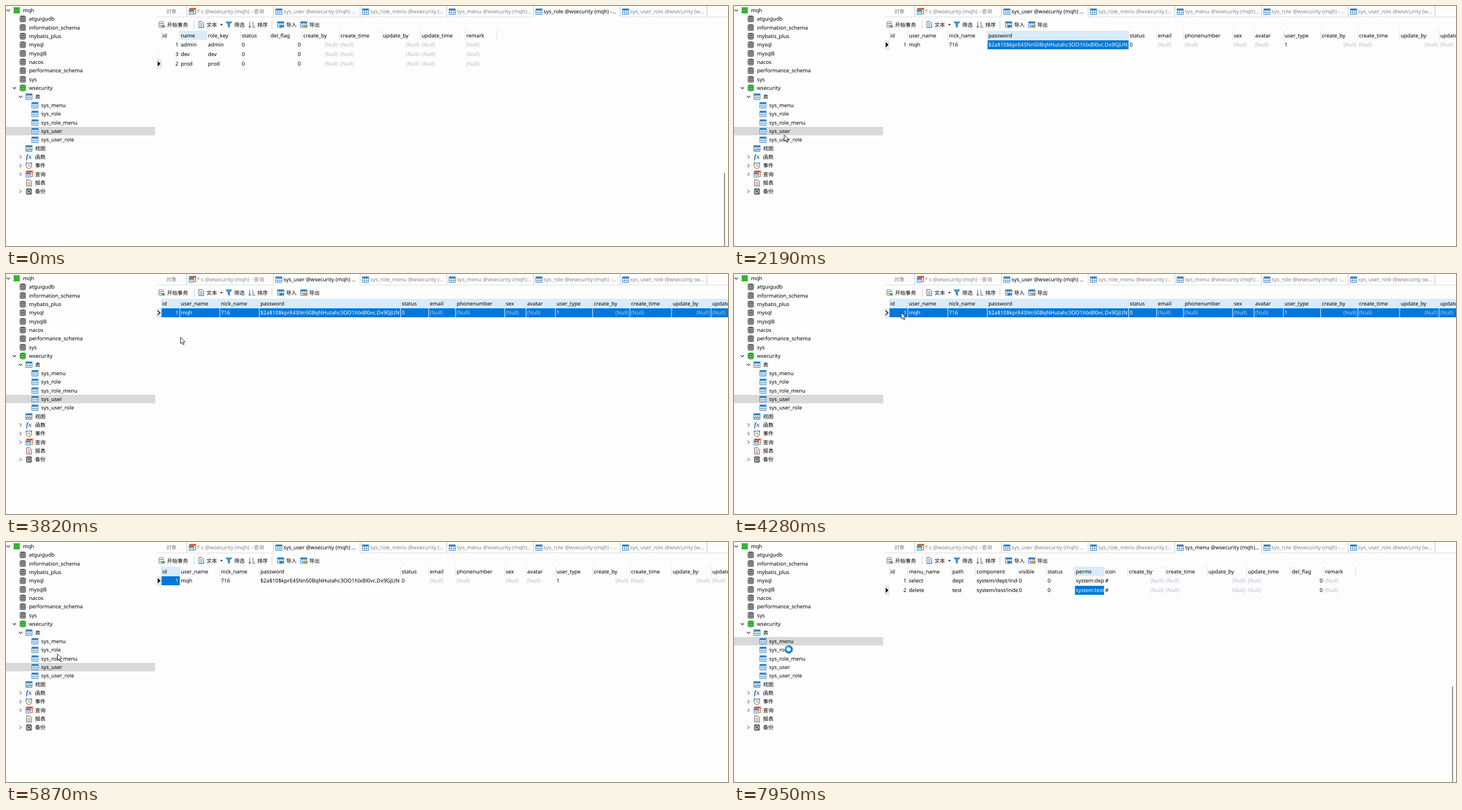
Recreate the animation shown at these times as an HTML page. Size 1280x427 px, loop 8000 ms.

```html
<!DOCTYPE html>
<html lang="zh-CN">
<head>
<meta charset="utf-8">
<title>Database tables</title>
<style>
html, body { margin: 0; width: 100%; height: 100%; overflow: hidden; background: #fdfdfd; }
svg { display: block; }
#stage { width: 1280px; height: 427px; }
text { font: 9.35px "Noto Sans", "Noto Sans CJK SC", "Noto Sans CJK", sans-serif; text-rendering: geometricPrecision; white-space: pre; }
</style>
</head>
<body>
<svg id="stage" viewBox="0 0 1280 427">
  <rect width="1280" height="427" fill="#fdfdfd"/>
  <g id="scene"></g>
  <g id="arrow">
    <path d="M.5 .5V12L3.2 9.5L5.1 13.8L7 13L5.1 8.8H8.6Z" fill="#fff" stroke="#111" stroke-width=".9"/>
  </g>
  <g id="busy" fill="none" stroke-width="3.8">
    <circle r="7.4" fill="#fff" stroke="none"/>
    <circle r="5.5" stroke="#1488d8"/>
    <path d="M-5.5 0A5.5 5.5 0 0 1 0 -5.5" stroke="#48b4ee"/>
  </g>
</svg>
<script>
const LOOP = 8000, LEFT = 275, STEP = 15.35;
const BLUE = '#0078d7', PALE = '#d9ebf9', NIL = '(Null)';
const $ = id => document.getElementById(id);

const rect = (x, y, w, h, fill, more = '') =>
  `<rect x="${x}" y="${y}" width="${w}" height="${h}" fill="${fill}" ${more}/>`;
const path = (d, stroke, w = 1, fill = 'none') =>
  `<path d="${d}" stroke="${stroke}" stroke-width="${w}" fill="${fill}"/>`;
const text = (x, y, s, fill = '#000', anchor = 'start') =>
  `<text x="${x}" y="${y}" fill="${fill}" text-anchor="${anchor}">${s}</text>`;
const at = (x, y, body) => `<g transform="translate(${x} ${y})">${body}</g>`;

// Icons, centred on 0,0
const grid = (c = '#2f80c2') => rect(-5.5, -5, 11, 10, '#fff', `stroke="${c}"`) +
  rect(-5.5, -5, 11, 3, c) + path('M-5.5 1.3H5.5M-1.9 -2V5M1.9 -2V5', c, .8);
const base = c => path('M-5.5 -4C-5.5 -6.6 5.5 -6.6 5.5 -4V4C5.5 6.6 -5.5 6.6 -5.5 4Z', 'none', 0, c) +
  [-3, .3, 3.4].map(y => path(`M-5.5 ${y - 1}C-5.5 ${y + 1} 5.5 ${y + 1} 5.5 ${y - 1}`, '#f2f2f2', .8)).join('');
const query = () => at(1, -1, grid('#d8552d')) + at(-1.5, 1.5, `<g transform="scale(.75)">${grid()}</g>`);
const page = c => path('M-4 -5.5H1.5L4.5 -2.5V5.5H-4Z', '#555', 1, '#fff') +
  path('M-2 -1.5H2.5M-2 1H2.5M-2 3.3H2.5', c, 1);
const view = () => grid() + path('M-4 3.5a2 2 0 1 0 4 0a2 2 0 1 0 4 0a2 2 0 1 0-4 0a2 2 0 1 0-4 0', '#456', .9, '#fff');
const fx = () => `<text x="-5" y="3.5" fill="#2566a8" style="font:italic bold 12px 'Liberation Serif',serif">fx</text>`;
const clock = () => '<circle r="5" fill="#fff" stroke="#555"/>' +
  path('M0 -3V0.5L2.5 1.5', '#3c9a3c', 1.1) + path('M-5.5 -3.5L-3.5 -5.5M5.5 -3.5L3.5 -5.5', '#555', 1.3);
const backup = () => rect(-5, -5.5, 10, 11, '#606060', 'rx="1.5"') +
  '<circle r="2.8" fill="none" stroke="#fff" stroke-width=".9"/>' + path('M-1 1L-3.5 4', '#fff', .9);
const begin = () => [-5, -1.6, 1.8].map(y => rect(-5.3, y, 9, 3.2, '#fff', 'rx="1.4" stroke="#606060" stroke-width=".8"')).join('') +
  path('M-1 3.2H5M3 1L5.3 3.2L3 5.4', '#35a435', 1.5);
const funnel = () => path('M-5.5 -5H5.5L1.5 0V5.5L-1.5 3.5V0Z', '#2f80c2', .8, '#3b98dc');
const sort = () => path('M-4 -5V5M-5.8 3L-4 5.2L-2.2 3', '#2f80c2', 1.2) +
  path('M0 -4.5H2M0 -1.5H3.2M0 1.5H4.5M0 4.5H6', '#555', 1.1);
const port = (d, c) => grid() + path(d, c, 1.8);

const chevron = (x, y, open) =>
  path(open ? `M${x - 3} ${y - 1.4}L${x} ${y + 1.6}L${x + 3} ${y - 1.4}` : `M${x - 1.5} ${y - 3}L${x + 1.6} ${y}L${x - 1.5} ${y + 3}`,
    open ? '#222' : '#777', 1.1);

// depth, label, icon, chevron (1 open, 0 closed)
const dark = () => base('#5c5c5c');
const TREE = [
  [0, 'mqh', () => rect(-5.5, -5.5, 11, 11, '#35b435'), 1],
  ...['atguigudb', 'information_schema', 'mybatis_plus', 'mysql', 'mysql8', 'nacos', 'performance_schema', 'sys'].map(s => [1, s, dark]),
  [1, 'wsecurity', () => base('#0f9a0f'), 1],
  [2, '表', grid, 1],
  ...['menu', 'role', 'role_menu', 'user', 'user_role'].map(s => [3, 'sys_' + s, grid]),
  [2, '视图', view], [2, '函数', fx, 0], [2, '事件', clock, 0], [2, '查询', query, 0],
  [2, '报表', () => page('#d8552d')], [2, '备份', backup, 0]
];

function tree(s) {
  let out = rect(0, Math.round(s.side * STEP), 264.5, 15, s.hot ? '#cce8ff' : '#d9d9d9');
  TREE.forEach(([depth, label, icon, open], i) => {
    const y = 7.7 + i * STEP, x = 19 + depth * 10.8;
    if (open !== undefined) out += chevron(x - 15, y, open);
    out += at(x, y, icon()) + text(x + 10.9, y + 3.3, label);
  });
  return out;
}

const db = '@wsecurity (mqh)';
const TABS = [`* s ${db} - 查询`, `sys_user ${db} ...`, 'sys_role_menu @wsecurity (...',
  `sys_menu ${db}...`, `sys_role ${db} -...`, 'sys_user_role @wsecurity (w...'];

function tabs(active) {
  let out = rect(267, 19, 1013, 1, '#dedede') + text(284, 13.3, '对象', '#808080');
  TABS.forEach((label, i) => {
    const x = 320.5 + i * 153.7, on = i === active;
    if (on) out += rect(x, 0, 153.7, 20, i === 5 ? '#f0f0f0' : '#fdfdfd');
    out += rect(x - .5, 0, 1, 19, '#c4c4c4') + at(x + 9.5, 10, i ? grid() : query()) +
      text(x + 17.8, 13.3, label, on ? '#000' : '#858585');
  });
  return out + rect(1242, 0, 1, 19, '#c4c4c4');
}

const TOOLS = [[276, '开始事务', begin], [346, '文本', () => page('#2f80c2')], [395, '筛选', funnel], [436, '排序', sort],
  [487, '导入', () => port('M6 3H-1M1.5 .5L-1.5 3L1.5 5.5', '#2f80c2')],
  [528, '导出', () => port('M-1 3H6M3.5 .5L6.2 3L3.5 5.5', '#e8902c')]];
const toolbar = TOOLS.map(([x, s, icon]) => at(x, 33, icon()) + text(x + 9.4, 36.7, s)).join('') +
  rect(333, 25, 1, 16, '#d0d0d0') + rect(471, 25, 1, 16, '#d0d0d0') +
  path('M379.5 32H384.5L382 35Z', 'none', 0, '#333');

// "name edge" per column; a trailing ">" aligns values right
const parse = s => s.split(', ').map((c, i, all) => {
  const [name, edge, right] = c.split(' ');
  return { name, x: i ? +all[i - 1].split(' ')[1] : LEFT, edge: +edge, right: !!right };
});
const nils = n => Array(n).fill(NIL);
const VIEWS = {
  role: {
    cols: parse('id 308 >, name 356, role_key 416, status 467, del_flag 525 >, create_by 591 >, create_time 666, update_by 735 >, update_time 814, remark 870'),
    rows: [[1, 'admin'], [3, 'dev'], [2, 'prod']].map(([id, n]) => [id, n, n, 0, 0, ...nils(5)])
  },
  link: { cols: parse('user_id 331 >, role_id 385 >'), rows: [[1, 1]] },
  user: {
    cols: parse('id 308 >, user_name 379, nick_name 449, password 699.5, status 749.5, email 797, phonenumber 884, sex 922, avatar 974, user_type 1040, create_by 1106 >, create_time 1180, update_by 1250 >, update_time 1329'),
    rows: [[1, 'mqh', '716', '$2a$10$kprE4SNn50BqNHutahc3OO1hIxBl0vc.Dx9GJUN', 0, ...nils(4), 1, ...nils(4)]]
  },
  menu: {
    cols: parse('id 308 >, menu_name 385, path 428, component 503, visible 554, status 604, perms 656, icon 698, create_by 764 >, create_time 839, update_by 909 >, update_time 987, del_flag 1046 >, remark 1102'),
    rows: [['select', 'dept'], ['delete', 'test']].map(([n, p], i) =>
      [i + 1, n, p, `system/${p}/index`, 0, 0, `system:${p}:list`, '#', ...nils(4), 0, NIL])
  }
};

const cell = (c, y, h, s, fill, right) =>
  `<svg x="${c.x}" y="${y}" width="${c.edge - c.x}" height="${h}">` +
  (right ? text(c.edge - c.x - 2.5, 11.5, s, fill, 'end') : text(2, 11.5, s, fill)) + '</svg>';

const heads = (cols, hot, all) => cols.map((c, i) =>
  (all || i === hot ? rect(c.x, 44, c.edge - c.x, 16.5, PALE) : '') + cell(c, 44, 16, c.name, '#000') +
  rect(c.edge - .5, 44, 1, 16.5, '#dcdcdc')).join('');

const rowTop = r => 61 + r * 16.9;

function table(s) {
  const { cols, rows } = VIEWS[s.mix ? 'role' : s.view];
  let out = rect(LEFT, 44, 1, 16.5, '#dcdcdc') + heads(cols, s.mix ? -1 : s.col, s.whole);
  rows.forEach((row, r) => {
    const y = rowTop(r);
    out += rect(267, y + 16, 8.5, .8, '#e8e8e8');
    row.forEach((v, i) => {
      const c = cols[i];
      const lit = r === s.row && (s.whole || s.fill && i === s.col);
      if (lit) out += rect(c.x + .5, y, c.edge - c.x - (s.whole ? 1 : .5), 16, BLUE);
      const ink = v === NIL ? (lit ? '#a5cdf0' : '#b9b9cf') : lit ? '#fff' : '#000';
      out += cell(c, y - .2, 16, v, ink, c.right);
    });
  });
  const y = rowTop(s.row), mark = s.mix ? rowTop(2) : y;
  out += rect(267, y, 8.5, 16, PALE);
  out += s.whole ? path(`M268.5 ${y + 4}L273 ${y + 8}L268.5 ${y + 12}`, '#111', 1.4)
    : path(`M269 ${mark + 3.6}V${mark + 12.4}L273.8 ${mark + 8}Z`, 'none', 0, '#000');
  if (s.mix) {
    out += rect(276, 44, 109, 16.5, '#fdfdfd') + heads(VIEWS.link.cols, 1) +
      [331, 385].map(x => rect(x - .5, 60.5, 1.2, 51, '#fdfdfd')).join('');
  }
  return out;
}

// Each entry changes part of the state from its time on
const CHANGES = [
  [0, { tab: 4, view: 'role', row: 2, col: 1, fill: 0, side: 14, hot: 0, thumb: 297 }],
  [70, { fill: 1 }],
  [960, { fill: 0, side: 15, hot: 1 }],
  [1230, { tab: 5, view: 'link', mix: 1, row: 0 }],
  [1280, { mix: 0, fill: 1, hot: 0, thumb: 0 }],
  [1950, { fill: 0, side: 14, hot: 1 }],
  [2130, { tab: 1, view: 'user', col: 3 }],
  [2190, { fill: 1, hot: 0 }],
  [3450, { whole: 1, col: -1 }],
  [4300, { whole: 0, col: 0 }],
  [6310, { fill: 0, side: 11, hot: 1 }],
  [6560, { tab: 3, view: 'menu', row: 1, col: 6, fill: 1, hot: 0, thumb: 257 }]
];

// time, x, y of the pointer
const TRAIL = [
  [70, 825, 399], [860, 91, 233], [910, 91, 233], [1040, 90, 231], [1750, 90, 231], [1790, 88.5, 229],
  [2510, 88.5, 229], [2640, 418, 210], [2800, 418, 210], [3260, 273, 68], [3630, 273, 68], [3820, 309, 112],
  [4260, 296, 68], [4520, 296, 68], [4710, 325, 130], [4920, 325, 130], [5120, 281, 157], [5640, 91, 201],
  [5760, 91, 201], [6290, 88, 178.5], [6560, 88, 178.5], [7000, 388, 109], [7280, 388, 109], [7900, 97, 191]
];

function pointer(t) {
  const i = TRAIL.findIndex(p => p[0] > t);
  if (i < 1) return (i ? TRAIL[TRAIL.length - 1] : TRAIL[0]).slice(1);
  const [a, x, y] = TRAIL[i - 1], [b, u, v] = TRAIL[i];
  const k = (t - a) / (b - a), e = k * k * (3 - 2 * k);
  return [x + (u - x) * e, y + (v - y) * e];
}

let shown = -1;
function draw(t) {
  const past = CHANGES.filter(c => c[0] <= t);
  if (past.length !== shown) {
    shown = past.length;
    const s = Object.assign({}, ...past.map(c => c[1]));
    $('scene').innerHTML = tree(s) + tabs(s.tab) + toolbar + table(s) +
      (s.thumb ? rect(1273, s.thumb, 1.6, 427 - s.thumb, '#777') : '');
  }
  const [x, y] = pointer(t), spin = t >= 7950;
  const show = (id, on) => {
    $(id).setAttribute('transform', `translate(${x} ${y})`);
    $(id).setAttribute('visibility', on ? 'visible' : 'hidden');
  };
  show('arrow', t >= 70 && !spin);
  show('busy', spin);
}

function tick() {
  draw(performance.now() % LOOP);
  requestAnimationFrame(tick);
}
tick();
</script>
</body>
</html>
```
